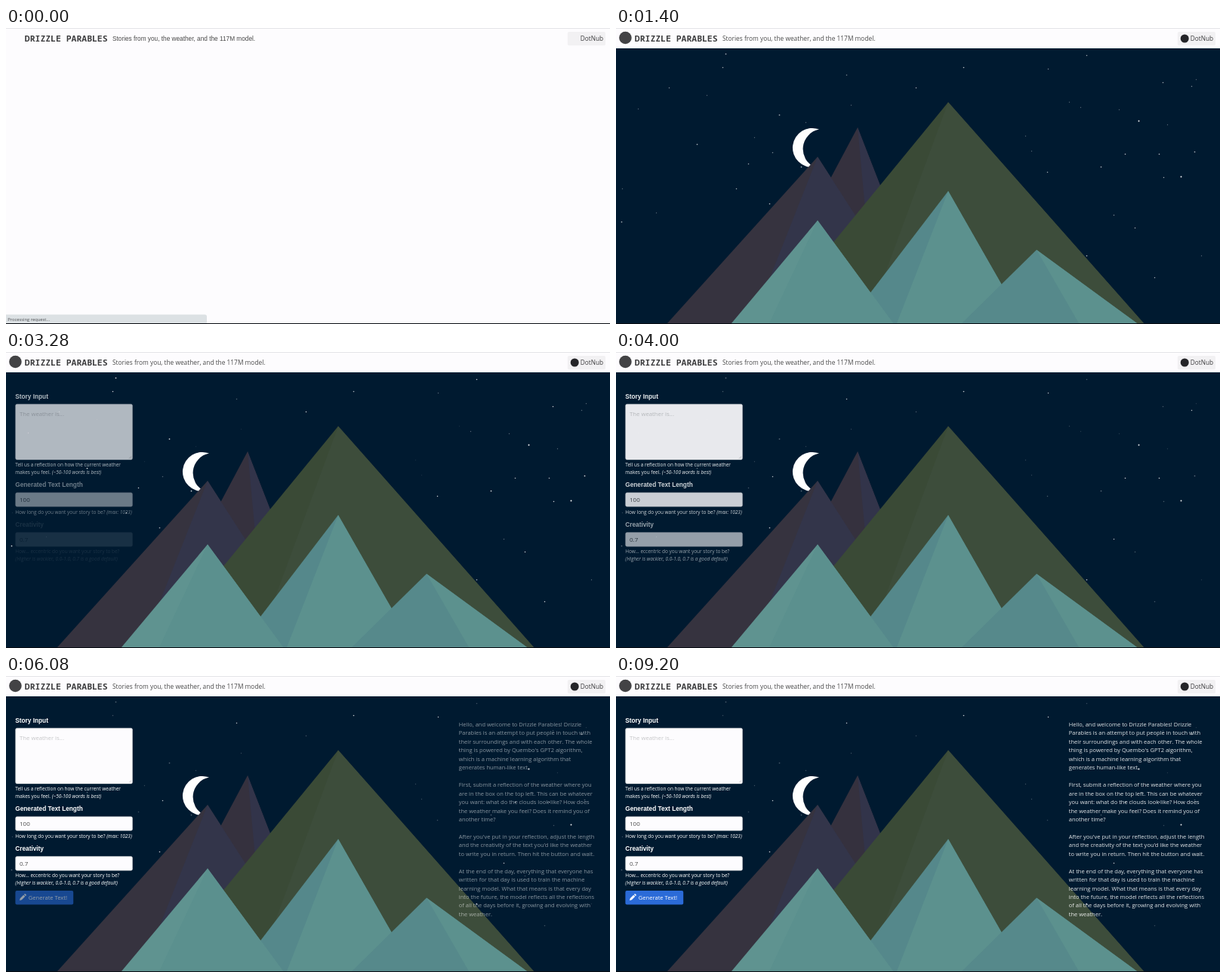
These frames come from a looping animation (800 by 393 pixels, 9320 ms). An HTML page:

```html
<!DOCTYPE html>
<html lang="en">
<head>
<meta charset="utf-8">
<title>Drizzle Parables</title>
<style>
  html, body { margin: 0; width: 100%; height: 100%; overflow: hidden; background: #fdfcfe; }
  svg { display: block; width: 100%; height: 100%; }
  text { font-family: "Open Sans", "Noto Sans", sans-serif; white-space: pre; }
  .label { font: bold 8.28px "Liberation Sans", Arial, sans-serif; fill: #fff; }
  .help { font-size: 6.46px; fill: #fff; }
  .help tspan { font-style: italic; }
  .value { font-size: 8px; fill: #4a4a4a; }
  .hint { font-size: 7.75px; fill: #c6c6c8; }
  .box { fill: #fdfcfe; stroke: #dbdbdb; stroke-width: .4; }
  .story { font-size: 7.5px; fill: #fff; fill-opacity: .88; }
</style>
</head>
<body>
<svg viewBox="0 0 800 393" preserveAspectRatio="none">
  <rect width="800" height="393" fill="#fdfcfe"/>
  <g id="scene">
    <rect y="27" width="800" height="366" fill="#001a30"/>
    <path id="moon" fill="#fff" d="M269 134.6A26 26 0 1 0 263 184.8A26.6 26.6 0 0 1 269 134.6Z"/>
    <g id="stars" fill="#fff"></g>
    <g id="peaks"></g>
  </g>

  <g id="form">
    <g>
      <text class="label" x="12.3" y="61.5">Story Input</text>
      <rect class="box" x="12.6" y="69.2" width="154.9" height="73.8" rx="2"/>
      <path d="M163 141.5l3-3M165 141.5l1-1" stroke="#999" stroke-width=".5"/>
      <text class="hint" x="18" y="84.5">The weather is...</text>
      <text class="help" x="12.3" y="152.4">Tell us a reflection on how the current weather</text>
      <text class="help" x="12.3" y="161.6">makes you feel. <tspan>(~50-100 words is best)</tspan></text>
    </g>
    <g>
      <text class="label" x="12.3" y="179">Generated Text Length</text>
      <rect class="box" x="12.6" y="186.7" width="154.9" height="18.6" rx="2"/>
      <text class="value" x="18" y="199.1">100</text>
      <text class="help" x="12.3" y="214.5">How long do you want your story to be? <tspan>(max: 1023)</tspan></text>
    </g>
    <g>
      <text class="label" x="12.3" y="232">Creativity</text>
      <rect class="box" x="12.6" y="239.6" width="154.9" height="18.6" rx="2"/>
      <text class="value" x="18" y="252.1">0.7</text>
      <text class="help" x="12.3" y="267.3">How... eccentric do you want your story to be?</text>
      <text class="help" x="12.3" y="276.5"><tspan>(Higher is wackier, 0.0-1.0, 0.7 is a good default)</tspan></text>
    </g>
    <g>
      <rect x="12.4" y="285" width="76.8" height="18.4" rx="2" fill="#2b6bd8"/>
      <path d="M18 298l.7-2.8 4.5-4.5 2.1 2.1-4.5 4.5zM23.8 290.1l.7-.7q.6-.5 1.2 0l.9.9q.5.6 0 1.2l-.7.7z" fill="#fff"/>
      <text x="29.8" y="297" font-size="7.6" fill="#fff">Generate Text!</text>
    </g>
    <g id="about"></g>
  </g>

  <rect width="800" height="27" fill="#fdfcfe"/>
  <rect width="800" height="1" fill="#e4e4e7"/>
  <text x="24.8" y="18.1" fill="#3c3c3e" style="font:bold 11.45px 'Noto Sans Mono','DejaVu Sans Mono',monospace">DRIZZLE PARABLES</text>
  <text id="tagline" x="141" y="17.2" fill="#4a4a4a">Stories from you, the weather, and the 117M model.</text>
  <rect x="743.8" y="5" width="50.2" height="18.2" rx="2" fill="#f2f1f3"/>
  <text x="760.8" y="17.3" font-size="8.28" fill="#3c3c3e">DotNub</text>
  <g id="icons">
    <circle cx="12.4" cy="13" r="8.3" fill="#434345"/>
    <circle cx="753.2" cy="14" r="5.5" fill="#242428"/>
  </g>

  <g id="status">
    <path id="bar" d="M0 380.5H263.5Q266 380.5 266 383V392H0Z"/>
    <text x="2.2" y="388.7" font-size="5.8" fill="#4a4c50">Processing request...</text>
  </g>
  <rect y="392" width="800" height="1" fill="#080c12"/>
</svg>
<script>
const LOOP = 9320, READY = 80, STATUS_END = 720, TWINKLE = 1050;
const $ = id => document.getElementById(id);

function add(parent, tag, attrs, text) {
  const el = document.createElementNS("http://www.w3.org/2000/svg", tag);
  for (const key in attrs) el.setAttribute(key, attrs[key]);
  if (text) el.textContent = text;
  return parent.appendChild(el);
}

// Each peak: apex, left foot, ridge foot, right foot (all on the ground line), two face colours.
const GROUND = 392;
[
  [320, 132, 182, 344, 421, "#35313e", "#32344a"],
  [267, 171, 68, 180, 409, "#36333f", "#33354a"],
  [440, 98.5, 200, 332, 699, "#3a4a36", "#3d4d3b"],
  [440, 216.5, 306, 372, 540, "#55888b", "#5c918e"],
  [267, 255.5, 153, 203, 367, "#5f9390", "#5b908e"],
  [557, 294.5, 458, 613, 690, "#56898b", "#5c918e"]
].forEach(([x, y, left, ridge, right, dark, light]) => {
  const face = (a, b, fill) =>
    add($("peaks"), "path", { d: `M${x} ${y}L${a} ${GROUND}H${b}Z`, fill });
  face(left, right, dark);
  face(ridge, right, light);
});

// Stars in a group share mean brightness, swing, phase and radius.
const groups = [
  { mean: .95, swing: .05, phase: 0, r: .95, at: "692,123 748,197" },
  { mean: .75, swing: .08, phase: .5, r: .8, at: "674,167 719,167 623,302 460,52 203,233" },
  { mean: .55, swing: .35, phase: .03, r: .85,
    at: "216,115 107,154 245,184 7,257 145,34 642,184 766,164" },
  { mean: .48, swing: .33, phase: .05, r: .75,
    at: "175,180 397,79 623,36 724,72 571,191 725,198 687,265 713,331 141,52 159,213" },
  { mean: .58, swing: .26, phase: .53, r: .75,
    at: "207,165 305,62 572,54 762,77 659,248 70,79" },
  { mean: .24, swing: .2, phase: .4, r: .65,
    at: "311,102 600,98 251,125 120,89 542,143 550,163 53,245 8,213 183,145" },
  { mean: .24, swing: .12, phase: .1, r: .65,
    at: "29,107 615,105 666,108 730,128 768,68 775,302" }
];
for (const g of groups) {
  g.el = add($("stars"), "g", {});
  for (const p of g.at.split(" ")) {
    const [x, y] = p.split(",").map(Number);
    add(g.el, "circle", { cx: x + .5, cy: y + .5, r: g.r });
  }
}

const story = `Hello, and welcome to Drizzle Parables! Drizzle
Parables is an attempt to put people in touch with
their surroundings and with each other. The whole
thing is powered by Quembo's GPT2 algorithm,
which is a machine learning algorithm that
generates human-like text.

First, submit a reflection of the weather where you
are in the box on the top left. This can be whatever
you want: what do the clouds look like? How does
the weather make you feel? Does it remind you of
another time?

After you've put in your reflection, adjust the length
and the creativity of the text you'd like the weather
to write you in return. Then hit the button and wait.

At the end of the day, everything that everyone has
written for that day is used to train the machine
learning model. What that means is that every day
into the future, the model reflects all the reflections
of all the days before it, growing and evolving with
the weather.`;
story.split("\n").forEach((line, i) =>
  line && add($("about"), "text", { class: "story", x: 599.8, y: 67 + i * 11.45 }, line));

// CSS "ease": cubic-bezier(.25, .1, .25, 1)
function ease(p) {
  if (p <= 0) return 0;
  if (p >= 1) return 1;
  const curve = (a, b, u) => 3 * a * u * (1 - u) ** 2 + 3 * b * u * u * (1 - u) + u ** 3;
  let lo = 0, hi = 1;
  for (let i = 0; i < 20; i++) {
    const mid = (lo + hi) / 2;
    if (curve(.25, .25, mid) < p) lo = mid; else hi = mid;
  }
  return curve(.1, 1, lo);
}

const fadeStarts = [2050, 2510, 2980, 5080, 5030];
const parts = [...$("form").children];
const show = (el, on) => el.setAttribute("visibility", on ? "visible" : "hidden");
const fade = (el, value) => el.setAttribute("opacity", value.toFixed(3));

function draw(t) {
  const ready = t >= READY;
  show($("scene"), ready);
  show($("icons"), ready);
  show($("status"), t < STATUS_END);
  $("bar").setAttribute("fill", ready ? "#e2e2e8" : "#dce1e4");
  $("tagline").style.fontFamily = ready ? "" : '"Liberation Sans", Arial, sans-serif';
  $("tagline").style.fontSize = ready ? "8.36px" : "8.28px";
  fade($("moon"), ease((t - 300) / 1200));
  for (const g of groups) {
    const turn = (t - 120) / TWINKLE - g.phase;
    fade(g.el, g.mean + g.swing * Math.cos(2 * Math.PI * turn));
  }
  parts.forEach((el, i) => fade(el, ease((t - fadeStarts[i]) / 3000)));
}

const start = performance.now();
function tick() {
  draw((performance.now() - start) % LOOP);
  requestAnimationFrame(tick);
}
draw(0);
requestAnimationFrame(tick);
</script>
</body>
</html>
```
